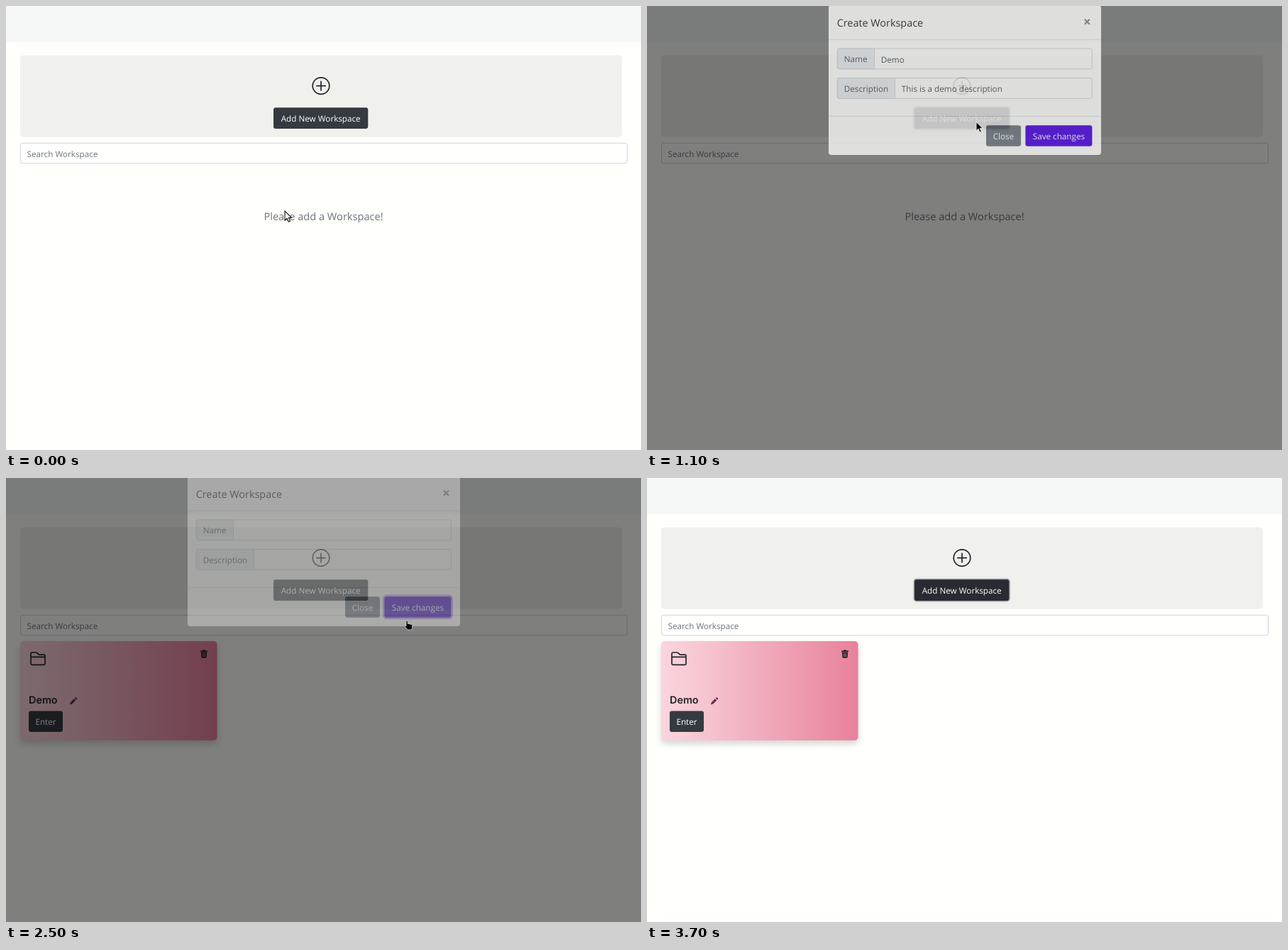
Animation, 895 px wide and 626 px high, one loop 3800 ms. Source, as an HTML page:

```html
<!DOCTYPE html>
<html lang="en">
<head>
<meta charset="utf-8">
<title>Workspaces</title>
<style>
  html, body { margin: 0; width: 100%; height: 100%; overflow: hidden; background: #fffffc; }
  svg { display: block; width: 895px; height: 626px; }
  text { font: 11.7px 'Open Sans', 'Noto Sans', sans-serif; text-rendering: geometricPrecision; white-space: pre; }
  .mid { text-anchor: middle; }
  .light { fill: #fff; }
  .body { fill: #495057; }
  .muted { fill: #6c757d; }
  .ink { fill: #212529; }
  .line { fill: none; stroke: #212529; }
  .field { fill: #fffffd; stroke: #ced4da; }
  .addon { fill: #e9ecef; stroke: #ced4da; }
  .rule { stroke: #dee2e6; }
  .note { font-size: 14.6px; fill: #6c757d; }
  .title { font-size: 14.4px; }
  .close { font-size: 19px; font-weight: 700; fill: #7f7f7f; }
  .name { font: 600 14.4px Inter, Roboto, sans-serif; }
  .shadow { filter: drop-shadow(0 5px 5px rgba(0, 0, 0, .16)); }
</style>
</head>
<body>
<svg viewBox="0 0 895 626">
  <defs>
    <linearGradient id="pink">
      <stop offset="0" stop-color="#fad4dc"/>
      <stop offset=".12" stop-color="#f8cdd6"/>
      <stop offset="1" stop-color="#e8819b"/>
    </linearGradient>
  </defs>

  <rect width="895" height="626" fill="#fffffc"/>
  <rect width="895" height="51" fill="#f6f8f7"/>
  <rect x="20" y="69.4" width="848" height="115.4" rx="5" fill="#f0f0ed"/>
  <circle class="line" cx="444" cy="112.6" r="11.8" stroke-width="1.7"/>
  <path class="line" d="M437.8 112.6h12.4M444 106.4v12.4" stroke-width="1.7" stroke-linecap="round"/>
  <rect id="addRing" fill="#52585d" fill-opacity=".5"/>
  <rect id="add" x="377" y="143.3" width="133.3" height="29.6" rx="3"/>
  <text class="mid light" x="443.7" y="162.6">Add New Workspace</text>
  <rect class="field" x="20.5" y="193.3" width="855" height="28.6" rx="3"/>
  <text class="muted" x="29.6" y="212.7">Search Workspace</text>
  <text id="empty" class="note mid" x="447.5" y="302">Please add a Workspace!</text>

  <g id="card">
    <rect class="shadow" x="20" y="230" width="277.6" height="140" rx="5" fill="url(#pink)"/>
    <path class="line" stroke-width="1.7" d="M36.5 246h5.6q1.2 0 2 .9l1.6 1.5q.8.7 1.8.7h6q1.5 0 1.5 1.5v11.2q0 1.5-1.5 1.5h-17q-1.5 0-1.5-1.5v-14.3q0-1.5 1.5-1.5zM35 252.3h20"/>
    <path class="ink" d="M274 243.4h3l.6-1.2h2.8l.6 1.2h3v1.6h-10zM274.8 245.6h8.4l-.6 7q-.1 1.2-1.2 1.2h-4.8q-1.1 0-1.2-1.2z"/>
    <path d="M277.2 247l.2 5M279 247v5M280.8 247l-.2 5" stroke="#e98aa2" stroke-width=".6"/>
    <path d="M90 319.5l.9-3.2 5-5 2.3 2.3-5 5zM96.700 310.500l1-1q.6-.5 1.200 0l1.100 1.100q.5.6 0 1.200l-1 1z" fill="#67295b"/>
    <text class="name ink" x="32" y="317.600">Demo</text>
    <rect x="32" y="328.500" width="48" height="29.400" rx="3" fill="#343a40"/>
    <text class="mid light" x="56" y="347.700">Enter</text>
  </g>

  <rect id="shade" width="895" height="626"/>

  <g id="modal">
    <rect x="256" y="17" width="384" height="211.300" rx="4" fill="#fffffd"/>
    <path class="rule" d="M256 65.500h384M256 173.800h384"/>
    <text class="title ink" x="267.700" y="47">Create Workspace</text>
    <text class="close mid" x="620.500" y="47.700">×</text>
    <rect class="field" x="268.300" y="78.300" width="359" height="28.800" rx="3"/>
    <path class="addon" d="M320.500 78.300h-49.200q-3 0-3 3v22.800q0 3 3 3h49.200z"/>
    <text class="body" x="277.800" y="97.400">Name</text>
    <rect class="field" x="268.300" y="119.800" width="359" height="28.800" rx="3"/>
    <path class="addon" d="M349.500 119.800h-78.200q-3 0-3 3v22.800q0 3 3 3h78.200z"/>
    <text class="body" x="277.800" y="139">Description</text>
    <g id="values">
      <text class="body" x="329.800" y="98">Demo</text>
      <text class="body" x="358.800" y="139.600">This is a demo description</text>
    </g>
    <rect id="close" x="478" y="186.500" width="49" height="29.500" rx="3"/>
    <text class="mid light" x="502.500" y="206">Close</text>
    <rect id="saveRing" fill="#6b3ff0" fill-opacity=".5"/>
    <rect id="save" x="533.400" y="186.500" width="94" height="29.500" rx="3"/>
    <text class="mid light" x="580.400" y="206">Save changes</text>
  </g>

  <path id="arrow" d="M0 0v13.200l3-2.800 2.200 4.800 2.300-1-2.100-4.700h4z" stroke-width="1.100"/>
  <path id="hand" d="M0 1.200q0-1.200 1.100-1.200t1.100 1.200v3l5.600 1.300q1.200.3 1.100 1.600l-.5 3.200-.6 2.700h-5.600l-3.600-4.200q-.8-1.200.2-1.700l1.200.5z" stroke="#e8e8ff" stroke-width=".7"/>
</svg>
<script>
const LOOP = 3800, TICK = 100;
const $ = id => document.getElementById(id);
const set = (id, attrs) => {
  for (const k in attrs) $(id).setAttribute(k, attrs[k]);
};
const show = (id, on) => set(id, { visibility: on ? 'visible' : 'hidden' });
const clamp = v => Math.min(1, Math.max(0, v));
const span = (t, start, length) => clamp((t - start) / length);

// Last row whose time has been reached.
const at = (rows, t) => rows.filter(r => r[0] <= t).pop();

// cubic-bezier(0, 0, .58, 1), solved by bisection
function easeOut(x) {
  let lo = 0, hi = 1, s = .5;
  for (let i = 0; i < 24; i++) {
    s = (lo + hi) / 2;
    if (1.74 * (1 - s) * s * s + s ** 3 < x) lo = s; else hi = s;
  }
  return s * s * (3 - 2 * s);
}

const pointer = [
  [0, 393, 289, 'arrow'], [100, 545, 279, 'arrow'], [200, 686, 290, 'arrow'],
  [400, 613, 264, 'arrow'], [600, 535, 212, 'arrow'], [700, 464, 163, 'arrow'],
  [1300, 474, 181, 'arrow'], [1400, 500, 212, 'hand'], [1500, 533, 207, 'hand'],
  [1600, 557, 201, 'hand'], [2000, 564, 201, 'hand'], [2600, 540, 212, 'arrow'],
  [2700, 430, 260, 'arrow'], [2800, 250, 290, 'arrow'], [2900, 90, 275, 'arrow'],
  [3000, 16, 243, 'arrow'], [3100, 17, 150, 'arrow'], [3200, 20, 60, 'arrow'],
  [3300, 24, 6, 'arrow'], [3400, 0, 0, 'none']
];
const addFill = [
  [0, '#343a40'], [600, '#2a2f34'], [700, '#1d2124'], [1400, '#343a40'],
  [2800, '#2a2f34'], [2900, '#23272b'], [3700, '#282b32']
];
const addRing = [[0, 0], [1000, 2.6], [1400, 0], [2800, 1.5], [2900, 2.6], [3700, 1.5]];
const closeFill = [[0, '#6c757d'], [1400, '#5a6268'], [1500, '#6c757d']];
const saveFill = [[0, '#4800e4'], [1500, '#4000d8'], [1600, '#3a00d0'], [2000, '#3800c8']];
const saveRing = [[0, 0], [2300, 2.6]];
const lift = [[0, 0], [2900, 1.3], [3000, 1.3], [3100, 0]];

function ring(id, target, w) {
  const get = k => +$(target).getAttribute(k);
  set(id, {
    x: get('x') - w, y: get('y') - w, rx: 3 + w,
    width: get('width') + 2 * w, height: get('height') + 2 * w
  });
  show(id, w > 0);
}

function draw(t) {
  const closing = t >= 2300;
  show('empty', !closing);
  show('card', closing);
  show('values', !closing);
  set('card', { transform: `translate(0 ${-at(lift, t)[1]})` });

  set('add', { fill: at(addFill, t)[1] });
  set('close', { fill: at(closeFill, t)[1] });
  set('save', { fill: at(saveFill, t)[1] });
  ring('addRing', 'add', at(addRing, t)[1]);
  ring('saveRing', 'save', at(saveRing, t)[1]);

  set('shade', { opacity: .5 * (span(t, 882, 150) - span(t, 2640, 150)) });
  const slide = easeOut(span(t, 987, 300)) - easeOut(span(t, 2401, 300));
  set('modal', {
    opacity: span(t, 987, 150) - span(t, 2401, 150),
    transform: `translate(0 ${-40 * (1 - slide)})`
  });

  const [, x, y, kind] = at(pointer, t);
  for (const id of ['arrow', 'hand']) {
    show(id, id === kind);
    set(id, { transform: `translate(${x} ${y})` });
  }
  const early = t < 900;
  set('arrow', { fill: early ? '#fff' : '#000', stroke: early ? '#111' : '#ddd' });
}

const start = performance.now();
function frame() {
  const t = (performance.now() - start) % LOOP;
  draw(Math.floor(t / TICK) * TICK);
  requestAnimationFrame(frame);
}
frame();
</script>
</body>
</html>
```
